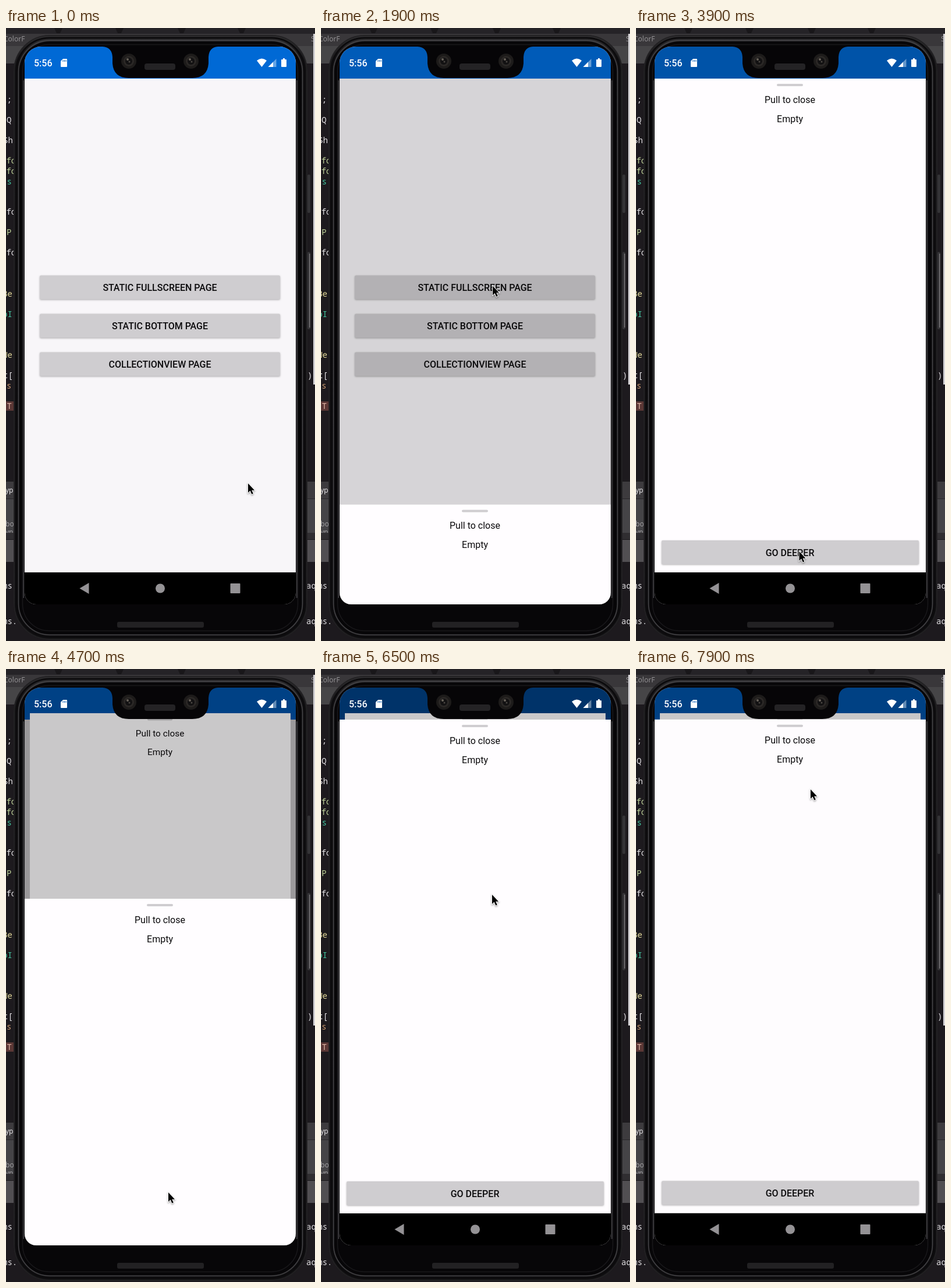
An HTML page with a canvas for the animation above (8 s loop, 531 by 1054 pixels).

```html
<!DOCTYPE html>
<html lang="en">
<head>
<meta charset="utf-8">
<title>Stacked sheets</title>
<style>
html, body { margin: 0; width: 100%; height: 100%; overflow: hidden; background: #1d1a1e; }
canvas { display: block; }
</style>
</head>
<body>
<canvas id="stage" width="531" height="1054"></canvas>
<script>
const ctx = document.getElementById('stage').getContext('2d');
const LOOP = 8000;
const SCREEN = { x: 32, y: 32, w: 466, h: 959, top: 87, navTop: 936 };
const SHEET_H = SCREEN.navTop - SCREEN.top;
const TRAVEL = 904;
const DIM = 0.21;
const CENTER = 264.5;

const sheets = [
  { open: 1720 },
  { open: 4421 },
  { open: 5527, drag: 7100, release: 7400 }
];
// time, x, y of the pointer tip
const pointerPath = [
  [0, 415, 782], [900, 360, 634], [1300, 293, 442], [1850, 293, 442],
  [2150, 307, 448], [2600, 307, 448], [3100, 290, 943], [3500, 280, 899],
  [4700, 278, 899], [5700, 281, 904], [6200, 281, 905], [6500, 293, 387],
  [7000, 297, 112], [7100, 297, 110], [7400, 299, 206], [8000, 299, 206]
];

const clamp = v => Math.max(0, Math.min(1, v));
const ease = v => v < 0.5 ? 4 * v ** 3 : 1 - (2 - 2 * v) ** 3 / 2;
const pressAt = (t, from, to) => clamp((t - from) / 100) * clamp((to + 150 - t) / 150);

function rect(x, y, w, h, fill) {
  ctx.fillStyle = fill;
  ctx.fillRect(x, y, w, h);
}
function roundRect(x, y, w, h, r, fill) {
  ctx.beginPath();
  ctx.roundRect(x, y, w, h, r);
  ctx.fillStyle = fill;
  ctx.fill();
}
function ring(x, y, w, h, r, color, width) {
  ctx.beginPath();
  ctx.roundRect(x, y, w, h, r);
  ctx.strokeStyle = color;
  ctx.lineWidth = width;
  ctx.stroke();
}
function circle(x, y, r, fill) {
  ctx.beginPath();
  ctx.arc(x, y, r, 0, Math.PI * 2);
  ctx.fillStyle = fill;
  ctx.fill();
}
function shape(path, fill) {
  ctx.fillStyle = fill;
  ctx.fill(new Path2D(path));
}
function text(str, x, baseline, color, font, align = 'left') {
  ctx.font = font;
  ctx.fillStyle = color;
  ctx.textAlign = align;
  ctx.fillText(str, x, baseline);
}
const label = (str, y, weight = 400) =>
  text(str, CENTER, y + 5.7, '#0b0a0c', weight + ' 16px Roboto, sans-serif', 'center');

function drawEditor() {
  rect(0, 0, 531, 1054, '#1d1a1e');
  rect(0, 0, 531, 10, '#252327');
  rect(0, 10, 531, 21, '#39373a');
  rect(0, 31, 531, 30, '#464547');
  for (const x of [90, 195, 302, 405]) shape(`M${x - 7} 0h14l-4 9h-6z`, '#19171a');
  rect(0, 780, 531, 30, '#3d3b3e');
  rect(0, 810, 531, 58, '#454447');
  rect(0, 809, 531, 1, '#29272a');
  rect(0, 868, 531, 12, '#302e31');
  rect(0, 880, 531, 38, '#514f52');
  rect(0, 879, 531, 1, '#19171a');
  rect(0, 642, 14, 16, '#5b3735');

  const white = '#e4e2e5', lime = '#c0d39a', teal = '#43c6a0', yellow = '#e6dd9c';
  const mono = '14px "Noto Sans Mono", monospace';
  const sans = '12px "Noto Sans", sans-serif';
  const code = [
    ['t;', -7, 123, white], ['Q', 1, 158, white], ['Sh', -5, 193, white],
    ['tfo', -8, 228, lime], ['tfo', -8, 246, lime], ['ts', -7, 264, teal],
    ['tfo', -8, 316, white], ['P', 1, 351, lime], ['tfo', -8, 386, white],
    ['Be', -6, 457, yellow], ['bI', -6, 492, teal], ['We', -6, 562, yellow],
    ['t[', -5, 597, white], ['s', 1, 615, '#cf9d72'], ['sT', -7, 650, '#e1b5a5'],
    ['ms', -6, 959, white], ['ms.', -6, 1020, white], [')', 518, 597, white],
    ['aq', 516, 959, white], ['aq', 516, 1020, white]
  ];
  for (const [str, x, y, color] of code) text(str, x, y + 5, color, mono);
  text('ColorF', -4, 23, '#918f92', sans);
  text('S', 524, 23, '#918f92', sans);
  text('yp', -1, 799, '#e4e2e5', sans);
  text('bo', -1, 857, '#a19fa2', sans);
  ctx.save();
  ctx.beginPath();
  ctx.rect(0, 858, 14, 10);
  ctx.clip();
  text('yn', -1, 871, '#a19fa2', sans);
  ctx.restore();
  rect(528, 10, 3, 603, '#d3d1d4');
}

function drawPhone() {
  roundRect(518, 252, 5, 66, 2, '#343336');
  roundRect(518, 385, 5, 133, 2, '#343336');
  rect(521, 388, 1.5, 127, '#777578');
  const body = ctx.createLinearGradient(0, 12, 0, 1054);
  body.addColorStop(0, '#333234');
  body.addColorStop(0.04, '#151416');
  body.addColorStop(1, '#111012');
  roundRect(13, 12, 505, 1040, 62, body);
  ring(14, 13, 503, 1038, 61, '#222123', 2);
  ring(18, 17, 495, 1030, 57, '#0c0b0d', 3);
  ring(21.5, 21.5, 488, 1022, 54, '#454447', 1.5);
  roundRect(23, 23, 485, 1019, 52, '#070608');
  ring(28.5, 28.5, 473, 1008, 46, '#19181b', 1.5);
  rect(29.5, 90, 1.5, 890, '#464548');
  rect(499, 90, 1.5, 890, '#464548');
  roundRect(191, 1021, 149, 10, 3, '#222123');
}

function drawNotch() {
  shape('M166 31H364V32Q349 33 348 50V61Q346 86 320 86H211Q185 86 183 61V50Q182 33 166 32Z', '#060507');
  for (const x of [211, 318]) {
    circle(x, 57, 13, '#1d1b1a');
    circle(x, 57, 9, '#2b2826');
    circle(x, 57, 6, '#121112');
    circle(x - 2, 54, 2, '#68625a');
    circle(x + 1, 58, 1.5, '#4b4743');
  }
  roundRect(238, 61, 53, 11, 4, '#242325');
}

function drawStatus() {
  text('5:56', 48, 66, '#fff', '500 16px Roboto, sans-serif');
  shape('M98 53H104Q105 53 105 54V66Q105 67 104 67H95Q94 67 94 66V57Z', '#fff');
  for (const x of [98, 100.5, 103]) rect(x - 0.5, 55, 1, 3, '#0059b3');
  shape('M431 56Q439.5 49 448 56L439.5 67Z', '#fff');
  shape('M464.5 53V67H450.5Z', 'rgba(255,255,255,.4)');
  shape('M459 58.5V67H450.5Z', '#fff');
  shape('M476 52H479V54H481Q482 54 482 55V66Q482 67 481 67H474Q473 67 473 66V55Q473 54 474 54H476Z', '#fff');
}

function button(str, x, y, w, press) {
  const shade = (from, to) => Math.round(from + (to - from) * press);
  ctx.save();
  ctx.shadowColor = 'rgba(0,0,0,.3)';
  ctx.shadowBlur = 3 + 5 * press;
  ctx.shadowOffsetY = 1 + press;
  roundRect(x, y, w, 41, 2, `rgb(${shade(207, 176)},${shade(205, 177)},${shade(208, 179)})`);
  ctx.restore();
  label(str, y + 21, 500);
}

function drawPage(t) {
  rect(SCREEN.x, SCREEN.y, SCREEN.w, SCREEN.h, '#f8f6f9');
  rect(SCREEN.x, SCREEN.y, SCREEN.w, 55, '#0069d5');
  button('STATIC FULLSCREEN PAGE', 58, 425.5, 413, pressAt(t, 1300, 1700));
  button('STATIC BOTTOM PAGE', 58, 491.5, 413, 0);
  button('COLLECTIONVIEW PAGE', 58, 557.5, 413, 0);
  rect(SCREEN.x, SCREEN.navTop, SCREEN.w, 55, '#000');
  shape('M126.5 963.5L142.5 954V973Z', '#949295');
  circle(265, 963.5, 8, '#949295');
  roundRect(385.5, 955, 17, 17, 1, '#949295');
}

function drawSheet(top, shrink, press) {
  const scale = 1 - shrink * 18 / SCREEN.w;
  ctx.save();
  ctx.translate(CENTER + 0.5, top - 11 * shrink);
  ctx.scale(scale, scale);
  ctx.translate(-CENTER - 0.5, 0);
  rect(SCREEN.x, 0, SCREEN.w, SHEET_H, '#fffdff');
  roundRect(242, 9, 45, 4, 2, '#cfcdd0');
  label('Pull to close', 36);
  label('Empty', 69);
  button('GO DEEPER', 44, 794, 442, press);
  ctx.restore();
}

function sheetState(sheet, t) {
  let dim = clamp((t - sheet.open) / 280);
  let top = SCREEN.top + TRAVEL * (1 - ease(clamp((t - sheet.open) / 500)));
  if (t > sheet.drag) {
    const pulled = 96 * clamp((t - sheet.drag) / (sheet.release - sheet.drag));
    top += pulled + (TRAVEL - 96) * ease(clamp((t - sheet.release) / 450));
    dim *= 1 - clamp((t - sheet.release - 160) / 347);
  }
  return { dim, top };
}

function drawPointer(t) {
  const i = pointerPath.findIndex(key => key[0] > t);
  const [t0, x0, y0] = pointerPath[i - 1];
  const [t1, x1, y1] = pointerPath[i];
  const k = (t - t0) / (t1 - t0);
  const p = k * k * (3 - 2 * k);
  ctx.save();
  ctx.translate(x0 + (x1 - x0) * p, y0 + (y1 - y0) * p);
  const arrow = new Path2D('M1 1V17L4.6 13.6L7.3 19.5L9.8 18.4L7.2 12.7H12Z');
  ctx.shadowColor = 'rgba(0,0,0,.4)';
  ctx.shadowBlur = 3;
  ctx.shadowOffsetY = 1.5;
  ctx.strokeStyle = '#fff';
  ctx.lineWidth = 1.8;
  ctx.stroke(arrow);
  ctx.shadowColor = 'transparent';
  ctx.fillStyle = '#000';
  ctx.fill(arrow);
  ctx.restore();
}

function draw(t) {
  drawEditor();
  drawPhone();
  ctx.save();
  ctx.beginPath();
  ctx.roundRect(SCREEN.x, SCREEN.y, SCREEN.w, SCREEN.h, [28, 28, 20, 20]);
  ctx.clip();
  drawPage(t);
  const states = sheets.map(sheet => sheetState(sheet, t));
  const presses = [pressAt(t, 4200, 4420), pressAt(t, 5350, 5525), 0];
  states.forEach(({ dim, top }, i) => {
    // the navigation bar keeps its brightness
    rect(SCREEN.x, SCREEN.y, SCREEN.w, SCREEN.navTop - SCREEN.y, `rgba(0,0,0,${DIM * dim})`);
    const shrink = i + 1 < states.length ? states[i + 1].dim : 0;
    if (top < SCREEN.y + SCREEN.h) drawSheet(top, shrink, presses[i]);
  });
  drawStatus();
  ctx.restore();
  drawNotch();
  drawPointer(t);
}

function frame(now) {
  draw(now % LOOP);
  requestAnimationFrame(frame);
}
draw(0);
requestAnimationFrame(frame);
</script>
</body>
</html>
```
